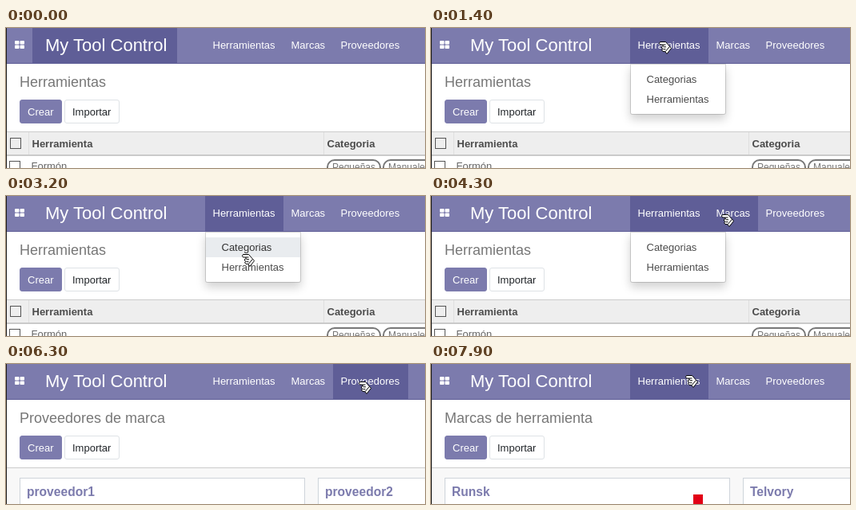
An HTML page for the animation above (8000 ms loop, 524 px wide and 176 px high).

```html
<!DOCTYPE html>
<html lang="es">
<head>
<meta charset="utf-8">
<title>My Tool Control</title>
<style>
  html, body { margin: 0; width: 100%; height: 100%; overflow: hidden; background: #fff; }
  body { font: 13px/15px "Liberation Sans", Arial, sans-serif; color: #4c4c4c; }
  body * { position: absolute; box-sizing: border-box; white-space: nowrap; }
  #stage { width: 524px; height: 176px; overflow: hidden; }

  nav { width: 524px; height: 45px; background: #7c7bad; border-bottom: 1px solid #5f5e97; color: #fff; line-height: 43px; }
  nav span { height: 44px; padding-left: 9.5px; }
  nav .hot { background: #5f5e97; }
  #brand { left: 33px; width: 181px; padding-left: 16px; font-size: 22px; }
  #tools { left: 249px; width: 98px; }
  #brands { left: 347px; width: 62px; }
  #suppliers { left: 409px; width: 94px; }
  nav svg { left: 11px; top: 16px; }

  #heading { left: 17px; top: 58px; font-size: 18px; line-height: 20px; color: #777; }
  .button { top: 90px; height: 30px; padding-left: 9px; line-height: 29px; border: 1px solid #dee2e6; border-radius: 3px; color: #212529; }
  .primary { background: #7c7bad; border-color: #7c7bad; color: #fff; }

  #list, #kanban { top: 130px; width: 524px; height: 46px; border-top: 1px solid #ccc; }
  #list header { width: 524px; height: 30px; background: #eee; border-bottom: 2px solid #cacaca; font-weight: bold; }
  #list hr { margin: 0; width: 1px; height: 28px; border: 0; background: #dfdfdf; }
  .check { width: 14px; height: 14px; border: 1px solid #555; }
  .tag { top: 34px; width: 68px; height: 20px; padding-left: 5px; border: 2px solid #777; border-radius: 10px; font-size: 12px; line-height: 16px; color: #777; }
  #kanban { background: #f8f8f8; }
  .card { top: 12px; width: 357px; height: 60px; padding: 8px; background: #fff; border: 1px solid #ced4da; font: bold 15.6px/17px "Liberation Sans", Arial, sans-serif; color: #7c7bad; }
  #logo { left: 328px; top: 33px; width: 12px; height: 12px; background: #e20015; }

  #menu { left: 249px; top: 45px; width: 120px; height: 64px; background: #fff; border: 1px solid rgba(0, 0, 0, .15); border-radius: 0 0 3px 3px; background-clip: padding-box; box-shadow: 0 6px 12px rgba(0, 0, 0, .175); clip-path: inset(0 -20px -20px); }
  #menu span { width: 118px; height: 25px; padding-left: 19.5px; line-height: 25px; }
  #menu .hot { background: #e9ecef; color: #333; }
  #edge { width: 1px; height: 176px; background: #1c1c1c; }
  #cursor { overflow: visible; }
</style>
</head>
<body>
<div id="stage">
  <nav>
    <svg width="12" height="10" fill="#fff">
      <rect width="5.5" height="4.5" rx="1"/><rect x="6.5" width="5.5" height="4.5" rx="1"/>
      <rect y="5.5" width="5.5" height="4.5" rx="1"/><rect x="6.5" y="5.5" width="5.5" height="4.5" rx="1"/>
    </svg>
    <span id="brand">My Tool Control</span>
    <span id="tools">Herramientas</span>
    <span id="brands">Marcas</span>
    <span id="suppliers">Proveedores</span>
  </nav>

  <div id="heading"></div>
  <div class="button primary" style="left:17px; width:53px">Crear</div>
  <div class="button" style="left:73px; width:69px">Importar</div>

  <div id="list">
    <header>
      <i class="check" style="left:5px; top:7px"></i>
      <hr style="left:28px"><hr style="left:397px">
      <span style="left:32.5px; top:7px">Herramienta</span>
      <span style="left:401.5px; top:7px">Categoria</span>
    </header>
    <i class="check" style="left:4px; top:36px"></i>
    <span style="left:31.5px; top:35px; color:#666">Formón</span>
    <span class="tag" style="left:401px">Pequeñas</span>
    <span class="tag" style="left:471px">Manuales</span>
  </div>

  <div id="kanban">
    <div class="card" id="first" style="left:17px"></div>
    <div class="card" id="second" style="left:390px"></div>
    <div id="logo"></div>
  </div>

  <div id="menu">
    <span id="category" style="top:6px">Categorias</span>
    <span id="tool" style="top:31px">Herramientas</span>
  </div>

  <div id="edge"></div>
  <svg id="cursor" width="17" height="17" fill="#fff" stroke="#000" stroke-linejoin="round">
    <path d="M1.5 .5H8.5L15.5 8.5L10 15.5L7.5 12.5H5L3.5 10.5L5 9.5L3.5 8V6.5L5.5 5.5L4.5 4H1.5Q-.5 2.2 1.5 .5Z"/>
    <path d="M4.5 4H8.5M5.5 6.8H9M5.5 9.7H8.5M13.3 6.5L8 12.8" fill="none"/>
  </svg>
</div>
<script>
  const LOOP = 8000, STEP = 100, APPEAR = 500;
  const OPEN = 1000, CLOSE = 4900;
  const byId = id => document.getElementById(id);

  // pointer moves: first step, last step, destination
  const origin = [256, 9];
  const moves = [
    [500, 700, 286, 6],
    [1400, 1500, 284, 28],
    [1700, 2000, 292, 74],
    [2200, 2400, 313, 85],
    [2900, 3000, 291, 79],
    [3200, 3300, 298, 67],
    [3500, 4100, 351, 23],
    [4300, 4300, 363, 23],
    [5300, 5500, 381, 20],
    [5700, 6000, 441, 22],
    [6800, 7200, 385, 16],
    [7500, 7700, 331, 14],
    [7900, 7900, 318, 14]
  ];
  const tools = { title: 'Herramientas' };
  const brands = { title: 'Marcas de herramienta', cards: ['Runsk', 'Telvory'], logo: true };
  const suppliers = { title: 'Proveedores de marca', cards: ['proveedor1', 'proveedor2'] };
  const pages = [[0, tools], [CLOSE, brands], [6300, suppliers], [7500, brands]];

  const show = (id, on) => { byId(id).style.display = on ? '' : 'none'; };
  const highlight = (id, on) => byId(id).classList.toggle('hot', on);

  function pointerAt(time) {
    let [x, y] = origin;
    for (const [first, last, toX, toY] of moves) {
      if (time < first) break;
      const count = (last - first) / STEP + 1;
      const done = Math.min(1, (Math.floor((time - first) / STEP) + 1) / count);
      x += (toX - x) * done;
      y += (toY - y) * done;
    }
    return [Math.round(x), Math.round(y)];
  }

  function showPage({ title, cards, logo }) {
    byId('heading').textContent = title;
    show('list', !cards);
    show('kanban', cards);
    show('logo', logo);
    if (cards) [byId('first').textContent, byId('second').textContent] = cards;
  }

  function draw(time) {
    const [x, y] = pointerAt(time);
    const visible = time >= APPEAR;
    const open = time >= OPEN && time < CLOSE;
    const over = (left, top, right, bottom) =>
      visible && x >= left && x < right && y + 1 >= top && y + 1 < bottom;

    showPage(pages.filter(([from]) => from <= time).pop()[1]);
    show('cursor', visible);
    byId('cursor').style.transform = `translate(${x}px, ${y}px)`;
    highlight('brand', !visible);
    highlight('tools', open || over(249, 0, 347, 44));
    highlight('brands', over(347, 0, 409, 44));
    highlight('suppliers', over(409, 0, 503, 44));
    show('menu', open);
    highlight('category', over(250, 52, 368, 77));
    highlight('tool', over(250, 77, 368, 102));
  }

  const start = performance.now();
  function tick() {
    draw((performance.now() - start) % LOOP);
    requestAnimationFrame(tick);
  }
  tick();
</script>
</body>
</html>
```
